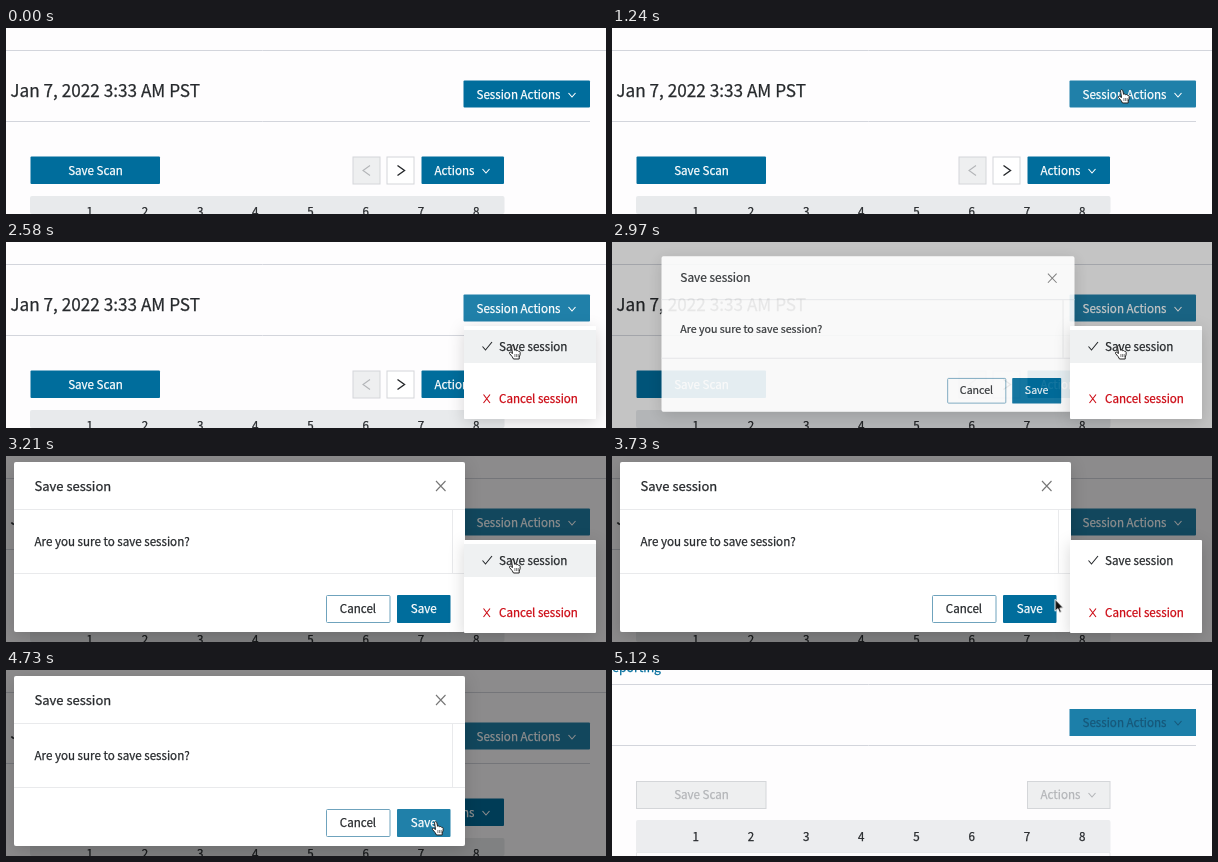
Animation, 600 px wide and 186 px high, one loop 5150 ms. Source, as an HTML page:

```html
<!DOCTYPE html>
<html lang="en">
<head>
<meta charset="utf-8">
<title>Save session</title>
<style>
  html, body { margin: 0; width: 100%; height: 100%; overflow: hidden; background: #fefdfe; }
  svg { display: block; width: 600px; height: 186px; color: #26292c; }
  text {
    font: 500 11.6px "Noto Sans CJK SC", "Noto Sans CJK JP", "Noto Sans CJK", "Noto Sans", sans-serif;
    fill: currentColor; stroke: currentColor; stroke-width: .25px; white-space: pre;
  }
  .mid { text-anchor: middle; }
  .light { color: #fff; }
  .off { color: #b3b5b8; }
  .red { color: #cc0a14; }
  .blue { color: #006d9c; }
  .dim { color: #17587a; }
  .main { fill: #006d9c; }
  .gray { fill: #eeeff0; stroke: #d4d6d9; }
  .rule { stroke: #d3d5dc; }
  .icon { fill: none; stroke: currentColor; stroke-width: 1.1; }
  .hand path { fill: #fff; stroke: #222; stroke-width: 1; stroke-linejoin: round; }
  .arrow path { fill: #111; stroke: #fff; stroke-width: 1; stroke-linejoin: round; }
</style>
</head>
<body>
<svg viewBox="0 0 600 186">
  <defs>
    <filter id="shade" x="-30%" y="-30%" width="160%" height="170%">
      <feDropShadow dx="0" dy="4" stdDeviation="8" flood-color="#000" flood-opacity=".16"/>
    </filter>
    <path id="down" d="M-3.5 -2 L0 2 L3.5 -2"/>
  </defs>

  <g id="before">
    <path class="rule" d="M0 22.5H600M0 93.5H584"/>
    <text x="194" y="68.5" text-anchor="end" style="font-size:17.2px">Scanned on Jan 7, 2022 3:33 AM PST</text>
    <rect id="session" class="main" x="457.5" y="52.5" width="126.5" height="27" rx="1"/>
    <text class="light" x="470.5" y="71">Session Actions</text>
    <use href="#down" class="icon light" x="566" y="67"/>
    <rect class="main" x="24.5" y="128.5" width="129.5" height="27.5" rx="1"/>
    <text class="light mid" x="89.5" y="147">Save Scan</text>
    <rect class="gray" x="347" y="129" width="27" height="27"/>
    <rect x="381" y="129" width="27" height="27" fill="#fff" stroke="#d4d6d9"/>
    <path class="icon off" d="M364 137.5L357 142.5L364 147.5"/>
    <path class="icon" d="M391.5 137.5L398.5 142.5L391.5 147.5" style="stroke-width:1.4"/>
    <rect class="main" x="415.5" y="128.5" width="82.5" height="27.5" rx="1"/>
    <text class="light" x="428.5" y="147">Actions</text>
    <use href="#down" class="icon light" x="480" y="143"/>
    <rect x="24" y="168" width="474.5" height="18" rx="2" fill="#e8eaec"/>
    <g class="digits" transform="translate(0 188)"></g>
  </g>

  <g id="after">
    <text class="blue" x="49" y="1.5" text-anchor="end" style="font-size:12.2px">Reporting</text>
    <path class="rule" d="M0 14.5H600M0 75.5H584"/>
    <rect x="457.5" y="39" width="126.5" height="27" fill="#1c7fa9"/>
    <text class="dim" x="470.5" y="57">Session Actions</text>
    <use href="#down" class="icon dim" x="566" y="53"/>
    <rect class="gray" x="24.5" y="111.5" width="129.5" height="27"/>
    <text class="off mid" x="89.5" y="129">Save Scan</text>
    <rect class="gray" x="415.5" y="111.5" width="82.5" height="27"/>
    <text class="off" x="428.5" y="129">Actions</text>
    <use href="#down" class="icon off" x="480" y="125"/>
    <path d="M24.5 186V182.5H498V186" fill="none" stroke="#e6e7e9"/>
    <rect x="24" y="150" width="474.5" height="32.5" rx="2" fill="#ecedef"/>
    <g class="digits" transform="translate(0 171)"></g>
  </g>

  <rect id="mask" width="600" height="186" fill="#000"/>

  <g id="modal">
    <rect x="8" y="6" width="451" height="170" rx="2" fill="#fff" filter="url(#shade)"/>
    <text x="28.5" y="34.5" style="font-size:13px">Save session</text>
    <path class="icon" style="color:#777" d="M430 25L439.5 35M439.5 25L430 35"/>
    <path d="M8 53.5H459M8 117.5H459M446.5 54V117" stroke="#e9eaec"/>
    <text x="28.5" y="89.5">Are you sure to save session?</text>
    <rect x="320.5" y="139.5" width="63.5" height="27" rx="1" fill="#fff" stroke="#6fa3bd"/>
    <text class="mid" x="352" y="157">Cancel</text>
    <rect id="save" class="main" x="391" y="139" width="53.5" height="28" rx="1"/>
    <text class="light mid" x="417.7" y="157">Save</text>
  </g>

  <g id="menu">
    <rect x="458" y="84" width="132" height="93" rx="1" fill="#fff" filter="url(#shade)"/>
    <rect id="item" x="458" y="88" width="132" height="33" fill="#eff1f2"/>
    <path class="icon" d="M476.5 104.5L479.5 108L486 100"/>
    <text x="493" y="108.5">Save session</text>
    <path class="icon red" d="M477.5 152.5L484 161M484 152.5L477.5 161"/>
    <text class="red" x="493" y="160.5">Cancel session</text>
  </g>

  <g id="cursor">
    <g class="hand">
      <path d="M-2.5 -5.5Q-1.3 -7.2 -.2 -5.5L.6 -1.7Q1.8 -2.6 2.6 -1.3Q3.9 -2 4.5 -.7Q6 -1 6.2 .5Q6.4 3 5.2 5V7H-.5Q-1.2 5 -4.5 1.5Q-5 0 -3.5 .2L-1.5 1.5Z"/>
      <path d="M.9 2V5M2.6 2V5M4.2 2V5" style="stroke-width:.6"/>
    </g>
    <g class="arrow"><path d="M-2 -6V6L.8 3.5L2.5 7.5L4.5 6.6L2.8 2.9H6.5Z"/></g>
  </g>
</svg>
<script>
  const LOOP = 5150;
  const start = document.timeline.currentTime ?? 0;

  for (const row of document.querySelectorAll('.digits')) {
    for (let i = 0; i < 8; i++) {
      const t = document.createElementNS('http://www.w3.org/2000/svg', 'text');
      t.setAttribute('x', 83.7 + i * 55.2);
      t.setAttribute('class', 'mid');
      t.textContent = i + 1;
      row.append(t);
    }
  }

  // Each step: [time in ms, value, easing towards the next step]
  function play(target, prop, steps) {
    const all = [[0, steps[0][1]], ...steps, [LOOP, steps.at(-1)[1]]];
    const frames = all.map(([t, value, easing = 'linear']) => ({ offset: t / LOOP, [prop]: value, easing }));
    const anim = document.querySelector(target).animate(frames, { duration: LOOP, iterations: Infinity });
    anim.startTime = start;
  }

  const at = (x, y) => `translate(${x}px, ${y}px)`;
  const scaleFrom = (x, y, sx, sy) => `${at(x, y)} scale(${sx}, ${sy}) ${at(-x, -y)}`;
  const zoom = s => scaleFrom(500, 103, s, s);   // grows from the clicked menu item
  const drop = s => scaleFrom(0, 84, 1, s);      // unfolds below the button
  const OUT = 'cubic-bezier(.08,.82,.17,1)';
  const INOUT = 'cubic-bezier(.78,.14,.15,.86)';
  const HOLD = 'step-end';
  const BASE = '#006d9c', HOVER = '#2080a9', SWAP = 5090;

  play('#before', 'opacity', [[0, 1, HOLD], [SWAP, 0]]);
  play('#after', 'opacity', [[0, 0, HOLD], [SWAP, 1]]);

  play('#session', 'fill', [[700, BASE, 'ease-in-out'], [1000, HOVER]]);
  play('#save', 'fill', [[3800, BASE, 'ease-in-out'], [4060, HOVER]]);

  play('#menu', 'opacity', [[1680, 0, OUT], [1980, 1], [4450, 1, 'ease-in'], [4650, 0]]);
  play('#menu', 'transform', [[1680, drop(.8), OUT], [1980, drop(1)], [4450, drop(1), 'ease-in'], [4650, drop(.8)]]);
  play('#item', 'opacity', [[2360, 0], [2560, 1], [3480, 1], [3680, 0]]);

  play('#mask', 'opacity', [[2820, 0], [3120, .45], [4940, .45], [5110, 0]]);
  play('#modal', 'opacity', [[2872, 0, OUT], [3172, 1], [4940, 1, INOUT], [5100, 0]]);
  play('#modal', 'transform', [[2872, zoom(.2), OUT], [3172, zoom(1)], [4940, zoom(1), INOUT], [5100, zoom(.2)]]);

  play('#cursor', 'opacity', [[0, 0, HOLD], [610, 1, HOLD], [SWAP, 0]]);
  play('#cursor', 'transform', [
    [610, at(546, 90), 'ease-out'], [1090, at(511, 68)], [2210, at(511, 68), 'ease-in-out'],
    [2580, at(508, 110)], [3330, at(508, 110), 'ease-in-out'], [3900, at(431, 158)]
  ]);
  const pointing = [[0, 0, HOLD], [690, 1, HOLD], [3640, 0, HOLD], [3740, 1]];
  play('.hand', 'opacity', pointing);
  play('.arrow', 'opacity', pointing.map(([t, v, e]) => [t, 1 - v, e]));
</script>
</body>
</html>
```
